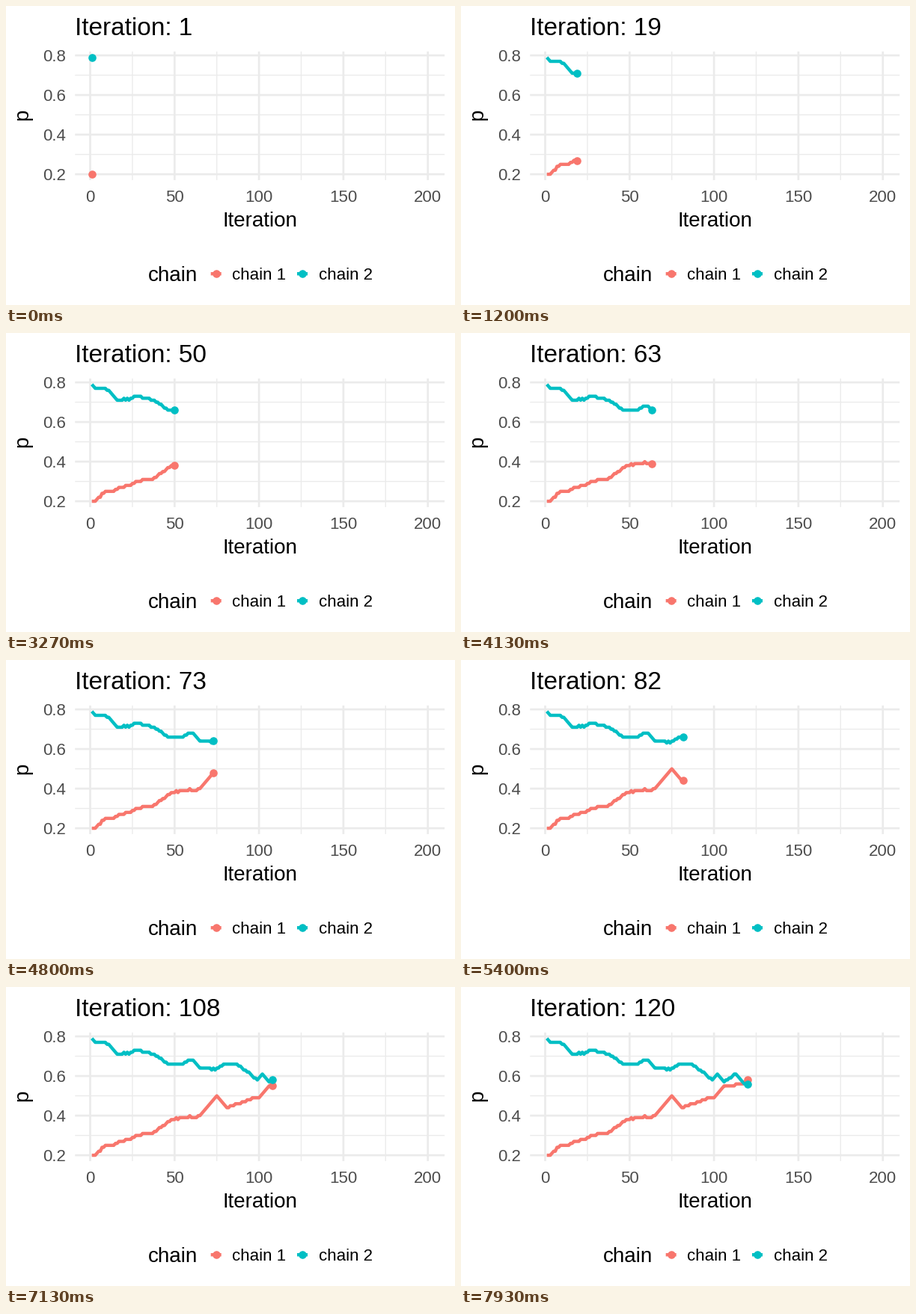
These frames come from a looping animation (600x400 px, 8000 ms). A matplotlib script:

```python
import numpy as np
import matplotlib
import matplotlib.pyplot as plt
from matplotlib.animation import FuncAnimation

matplotlib.rcParams["font.family"] = "Liberation Sans"

W, H, DPI = 600, 400, 100
PT = 72 / DPI  # points per pixel
ITERATIONS, SUB, LOOP_MS = 120, 3, 8000  # SUB drawn frames per iteration

LEFT, RIGHT, TOP, BOTTOM = 92.3, 586.1, 60.9, 232.9
RED, TEAL = "#F8766D", "#00BFC4"
GRID, TICK = "#EBEBEB", "#4D4D4D"
LINE_W, DOT = 4.4, 10.6


def to_x(i):
    """Iteration to pixel; the range 1..200 is padded by 5 %."""
    return LEFT + (i - 1 + 9.95) / 218.9 * (RIGHT - LEFT)


def to_y(p):
    """Probability to pixel; the range 0.20..0.79 is padded by 5 %."""
    return BOTTOM - (p - 0.1705) / 0.649 * (BOTTOM - TOP)


steps = np.arange(1, ITERATIONS + 1)
rng = np.random.default_rng(4)


def walk(*keys):
    """Trend through key points with slight jitter, kept to steps of 0.01."""
    trend = np.interp(steps, *zip(*keys))
    return np.round(trend + rng.uniform(-0.003, 0.003, ITERATIONS), 2)


chain1 = walk((1, 0.20), (3, 0.20), (9, 0.25), (13, 0.25), (30, 0.305),
              (37, 0.31), (48, 0.38), (57, 0.395), (63, 0.39), (66, 0.41),
              (75, 0.50), (81, 0.44), (97, 0.49), (100, 0.49), (106, 0.55),
              (116, 0.555), (120, 0.58))
chain2 = walk((1, 0.79), (3, 0.77), (9, 0.77), (16, 0.71), (23, 0.715),
              (28, 0.73), (37, 0.71), (47, 0.66), (54, 0.655), (58, 0.68),
              (61, 0.68), (65, 0.64), (74, 0.635), (80, 0.66), (87, 0.66),
              (99, 0.58), (102, 0.61), (106, 0.57), (113, 0.61),
              (118, 0.56), (120, 0.56))

fig = plt.figure(figsize=(W / DPI, H / DPI), dpi=DPI, facecolor="white")
ax = fig.add_axes([0, 0, 1, 1])
ax.set_xlim(0, W)
ax.set_ylim(H, 0)
ax.axis("off")


def line(xs, ys, color, width, z):
    return ax.plot(xs, ys, color=color, lw=width * PT, zorder=z, snap=False,
                   solid_capstyle="butt", solid_joinstyle="round")[0]


def dot(x, y, color, z):
    return ax.plot([x], [y], "o", color=color, ms=DOT * PT, mew=0, zorder=z,
                   snap=False)[0]


def label(x, y, s, size, color="black", ha="left", **kw):
    return ax.text(x, y, s, fontsize=size, color=color, ha=ha,
                   va="baseline", **kw)


def grid(xs, ys, width, z):
    for x in xs:
        line([to_x(x)] * 2, [TOP, BOTTOM], GRID, width, z)
    for y in ys:
        line([LEFT, RIGHT], [to_y(y)] * 2, GRID, width, z)


x_ticks, y_ticks = range(0, 201, 50), (0.2, 0.4, 0.6, 0.8)
grid(range(25, 200, 50), (0.3, 0.5, 0.7), 1.35, 1)
grid(x_ticks, y_ticks, 2.7, 2)

for t in x_ticks:
    label(to_x(t), 262, str(t), 16, TICK, "center")
for t in y_ticks:
    label(80.3, to_y(t) + 8, f"{t:.1f}", 16, TICK, "right")

label((LEFT + RIGHT) / 2, 295, "Iteration", 20, ha="center")
label(29.5, (TOP + BOTTOM) / 2 + 6.5, "p", 20, rotation=90,
      rotation_mode="anchor")
title = label(LEFT, 39, "", 24)

# legend
label(189.7, 368, "chain", 20)
for x, name, color in ((280.7, "chain 1", RED), (396, "chain 2", TEAL)):
    line([x - 7, x + 7], [358.2] * 2, color, LINE_W, 3)
    dot(x, 358.2, color, 4)
    label(x + 21.8, 366, name, 16)

xs = to_x(steps)
chains = [
    (to_y(p), line([], [], color, LINE_W, 3 + k), dot(0, 0, color, 6 + k))
    for k, (p, color) in enumerate(((chain1, RED), (chain2, TEAL)))
]


def draw(frame):
    # each iteration appears one drawn frame early, so it is never late
    n = min((frame + 1) // SUB + 1, ITERATIONS)
    title.set_text(f"Iteration: {n}")
    for ys, path, head in chains:
        path.set_data(xs[:n], ys[:n])
        head.set_data(xs[n - 1:n], ys[n - 1:n])
    return [title] + [a for c in chains for a in c[1:]]


frames = ITERATIONS * SUB
anim = FuncAnimation(fig, draw, frames=frames, interval=LOOP_MS / frames,
                     init_func=lambda: draw(0), repeat=True, repeat_delay=0,
                     blit=False)
plt.show()
```
